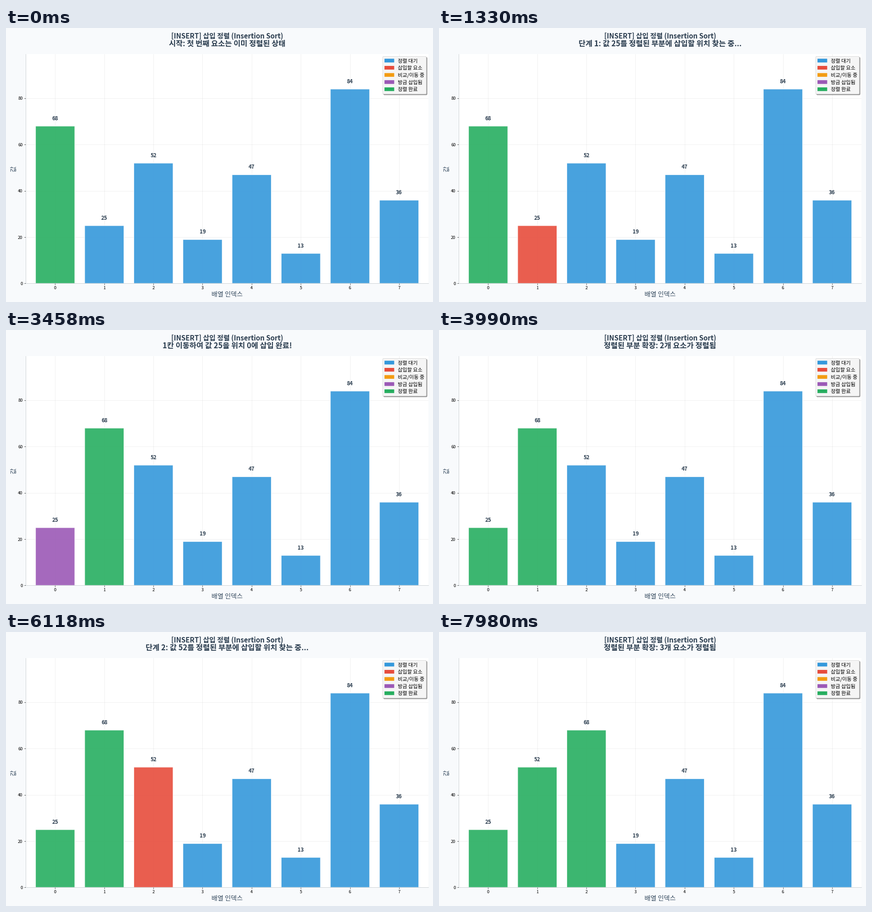
Animation, 933 px wide and 600 px high, one loop 8000 ms. Source, as a matplotlib script:

```python
import matplotlib.pyplot as plt
from matplotlib.animation import FuncAnimation
from matplotlib.patches import FancyBboxPatch, Rectangle

W, H, DPI = 933, 600, 100
LEFT, RIGHT, TOP, BOTTOM = 43, 923.33, 57, 559.4
LOOP, TICK, HOLD = 8000, 20, 1330

VALUES = [68, 25, 52, 19, 47, 13, 84, 36]
WAITING, KEY, MOVING, PLACED, DONE = (
    "#3498db", "#e74c3c", "#f39c12", "#9b59b6", "#27ae60")
INK = "#2c3e50"

plt.rcParams["font.family"] = "Noto Sans CJK JP"


def pt(px):
    """Pixels to points."""
    return px * 72 / DPI


fig = plt.figure(figsize=(W / DPI, H / DPI), dpi=DPI, facecolor="#f8fafc")

# Chart
ax = fig.add_axes([LEFT / W, 1 - BOTTOM / H, (RIGHT - LEFT) / W, (BOTTOM - TOP) / H])
ax.set_xlim(-0.6, 7.6)
ax.set_ylim(0, max(VALUES) * 1.18)
ax.set_xticks(range(len(VALUES)))
ax.set_yticks(range(0, 81, 20))
ax.set_axisbelow(True)
ax.grid(True, color="#b0b0b0", alpha=0.25, linewidth=pt(0.74))
ax.tick_params(length=pt(3.24), width=pt(0.74), labelsize=pt(9.26))
ax.tick_params(axis="x", pad=pt(2.6))
ax.tick_params(axis="y", pad=pt(3.24))
for side, spine in ax.spines.items():
    spine.set_visible(side in ("left", "bottom"))
    spine.set_color("#bdc3c7")
    spine.set_linewidth(pt(0.74))

# Unsnapped edges keep the bars at their fractional pixel positions
bars = ax.bar(range(len(VALUES)), VALUES, width=0.8, color=WAITING,
              edgecolor="white", linewidth=pt(1.39), alpha=0.9, snap=False)
numbers = [ax.text(i, 0, "", ha="center", va="baseline", color=INK,
                   fontsize=pt(11.5), fontweight="bold")
           for i in range(len(VALUES))]

# Overlay measured in stage pixels, y pointing down
page = fig.add_axes([0, 0, 1, 1])
page.set_xlim(0, W)
page.set_ylim(H, 0)
page.axis("off")


def label(x, y, text, size, **style):
    """Text on one line whose glyphs are centred on height y."""
    return page.text(x, y + 0.38 * size, text, fontsize=pt(size),
                     va="baseline", **style)


middle = (LEFT + RIGHT) / 2
heading = dict(ha="center", color=INK, fontweight="bold")
label(middle, 17, "[INSERT] 삽입 정렬 (Insertion Sort)", 15, **heading)
subtitle = label(middle, 33.2, "", 16.5, **heading)
label(middle, 582.3, "배열 인덱스", 14.2, ha="center", color="#34495e")
page.text(17, 309, "값", fontsize=pt(14), rotation=90, ha="center",
          va="center", color="#34495e")


def legend_box(x, y, **style):
    page.add_patch(FancyBboxPatch(
        (x, y), 95, 82.3, boxstyle="round,pad=0,rounding_size=2",
        linewidth=pt(0.93), **style))


legend_box(825.1, 64.2, facecolor="#4c4c4c", edgecolor="#4c4c4c", alpha=0.5)
legend_box(823.3, 62.4, facecolor="white", edgecolor="#cccccc", alpha=0.9)
legend = [("정렬 대기", WAITING), ("삽입할 요소", KEY), ("비교/이동 중", MOVING),
          ("방금 삽입됨", PLACED), ("정렬 완료", DONE)]
for row, (name, color) in enumerate(legend):
    y = 71.4 + 15.67 * row
    page.add_patch(Rectangle((827.4, y - 3.6), 20.4, 7.2, facecolor=color,
                             edgecolor=color, linewidth=pt(0.93), snap=False))
    label(855.8, y, name, 11.2, color="black")


def insert(data, k):
    """Move item k into the sorted part before it; return its new place."""
    key = data.pop(k)
    pos = k
    while pos > 0 and data[pos - 1] > key:
        pos -= 1
    data.insert(pos, key)
    return pos


def sort_state(step):
    """Values, bar colours and message for one step of the sort."""
    data = VALUES[:]
    if step == 0:
        colors = [DONE] + [WAITING] * 7
        return data, colors, "시작: 첫 번째 요소는 이미 정렬된 상태"

    k, phase = (step - 1) // 3 + 1, (step - 1) % 3
    for i in range(1, k):
        insert(data, i)
    key = data[k]
    colors = [DONE if i <= k else WAITING for i in range(len(data))]
    if phase == 0:
        colors[k] = KEY
        return data, colors, f"단계 {k}: 값 {key}를 정렬된 부분에 삽입할 위치 찾는 중..."

    pos = insert(data, k)
    if phase == 1:
        colors[pos] = PLACED
        return data, colors, f"{k - pos}칸 이동하여 값 {key}을 위치 {pos}에 삽입 완료!"
    return data, colors, f"정렬된 부분 확장: {k + 1}개 요소가 정렬됨"


def update(frame):
    step = (frame * TICK + TICK // 2) // HOLD
    data, colors, message = sort_state(step)
    for bar, number, value, color in zip(bars, numbers, data, colors):
        bar.set_height(value)
        bar.set_facecolor(color)
        number.set_y(value + 2.55)
        number.set_text(str(value))
    subtitle.set_text(message)
    return [*bars, *numbers, subtitle]


anim = FuncAnimation(fig, update, frames=LOOP // TICK, interval=TICK,
                     init_func=lambda: update(0), repeat=True, repeat_delay=0)
plt.show()
```
